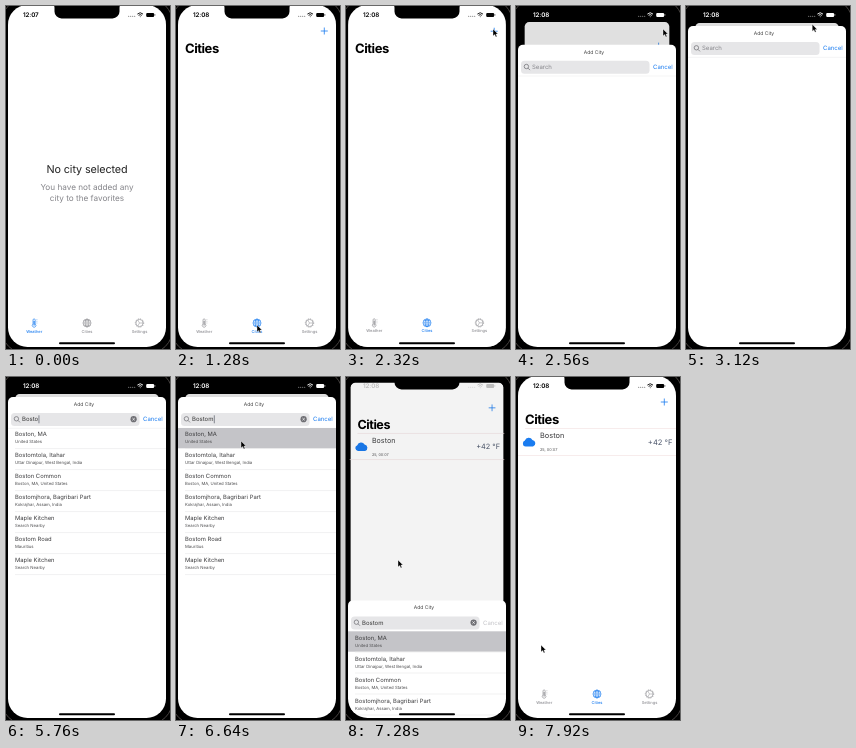
An HTML page that plays this animation: 164x343 px, repeating every 8 s.

```html
<!DOCTYPE html>
<html lang="en">
<head>
<meta charset="utf-8">
<title>Add a city</title>
<style>
  html, body { margin: 0; width: 100%; height: 100%; overflow: hidden; background: #000; }
  svg { display: block; width: 100vw; height: 100vh; }
  text { font-family: Inter, Roboto, sans-serif; white-space: pre; text-rendering: geometricPrecision; }
  .mid { text-anchor: middle; }
  .blue { fill: #1a7cf0; }
  .big { font-size: 10.8px; letter-spacing: -.1px; fill: #222; }
  .hint { font-size: 8.2px; fill: #85858a; }
  .title { font-size: 13px; font-weight: 700; letter-spacing: -.45px; }
  .field { font-size: 6px; }
  .name { font-size: 5.85px; fill: #3c3c3e; }
  .sub { font-size: 4.25px; fill: #4c4c4e; }
  .clock { font-size: 6.3px; font-weight: 600; letter-spacing: -.15px; }
  .line { stroke: #f2dfe0; stroke-width: .6; }
  .tab { color: #8e8e93; }
  .tab.on { color: #1a7cf0; }
  .tab text { font-size: 4px; font-weight: 500; fill: currentColor; }
  .tab g { fill: none; stroke: currentColor; stroke-width: .65; }
</style>
</head>
<body>
<svg viewBox="0 0 164 343">
  <defs>
    <clipPath id="screen"><rect x="2" y="-1" width="158" height="342" rx="19.5"/></clipPath>
  </defs>
  <rect x="-5" y="-8" width="172" height="356" rx="26" fill="#000" stroke="#4a4543" stroke-width="1"/>

  <g clip-path="url(#screen)">
    <g id="card">
      <rect id="page" x="2" y="-1" width="158" height="342" fill="#fff"/>
      <g id="weather" class="mid">
        <text class="big" x="81" y="167">No city selected</text>
        <text class="hint" x="81" y="184.3">You have not added any</text>
        <text class="hint" x="81" y="195.3">city to the favorites</text>
      </g>
      <g id="cities">
        <path d="M144.8 25h7M148.3 21.5v7" stroke="#1a7cf0" stroke-width=".8"/>
        <text class="title" x="9" y="46.7">Cities</text>
        <g id="saved">
          <path class="line" d="M9 51.5H161M1 78.5H161"/>
          <path class="blue" d="M9.6 69.600A3.1 3.1 0 0 1 8.9 63.600A4.1 4.1 0 0 1 16.4 63A3.4 3.4 0 0 1 17 69.600Z"/>
          <text x="24" y="61.3" font-size="7.4" fill="#3c3c3e">Boston</text>
          <text x="24" y="74.4" font-size="3.9" fill="#4c4c4e">25, 00:07</text>
          <text x="156.5" y="67.7" font-size="7.6" fill="#4c566b" text-anchor="end">+42 °F</text>
        </g>
      </g>
      <g class="mid">
        <g class="tab" id="tab0">
          <g>
            <path d="M27 318V314a1.1 1.1 0 0 1 2.2 0V318a1.8 1.8 0 1 1-2.2 0Z"/>
            <path d="M28.1 315v4.6" stroke-width="1.1"/>
            <path d="M30.4 313.6h1M30.4 315.3h1M30.4 317h1" stroke-width=".4"/>
          </g>
          <text x="28.2" y="326.6">Weather</text>
        </g>
        <g class="tab" id="tab1">
          <g>
            <circle cx="81" cy="317" r="4"/>
            <ellipse cx="81" cy="317" rx="1.9" ry="4"/>
            <path d="M77 317h8M81 313v8M77.7 314.8h6.6M77.7 319.2h6.6" stroke-width=".5"/>
          </g>
          <text x="81" y="326.6">Cities</text>
        </g>
        <g class="tab" id="tab2">
          <g>
            <circle cx="133.5" cy="317" r="3.6"/>
            <circle cx="133.5" cy="317" r="4.2" stroke-dasharray="1.1 1.1"/>
            <path d="M133.5 317h3.5M133.5 317l-1.8-3M133.5 317l-1.8 3" stroke-width=".5"/>
          </g>
          <text x="133.5" y="326.6">Settings</text>
        </g>
      </g>
      <rect id="dim" x="2" y="-1" width="158" height="342" fill="#000"/>
    </g>

    <g id="status">
      <text class="clock" id="clock" x="17" y="11.2"></text>
      <g opacity=".6">
        <circle cx="122.7" cy="10.2" r=".55"/><circle cx="124.7" cy="10.2" r=".55"/>
        <circle cx="126.7" cy="10.2" r=".55"/><circle cx="128.7" cy="10.2" r=".55"/>
      </g>
      <path id="wifi" d="M131.4 8.1a4 4 0 0 1 5.6 0M132.6 9.4a2.300 2.300 0 0 1 3.200 0M133.900 10.700h.6" fill="none" stroke-width=".9"/>
      <rect x="140.2" y="6.9" width="8" height="4" rx="1.2"/>
      <rect x="148.6" y="8.1" width=".7" height="1.6" rx=".3" opacity=".6"/>
    </g>

    <g id="sheet">
      <path d="M2 343V25a5 5 0 0 1 5-5H155a5 5 0 0 1 5 5V343Z" fill="#fff"/>
      <text class="mid" x="78" y="28.8" font-size="5" fill="#444">Add City</text>
      <rect x="5" y="36" width="128.5" height="13" rx="3.5" fill="#e6e6e8"/>
      <g fill="none" stroke="#77777c" stroke-width=".8">
        <circle cx="10.4" cy="41.8" r="2.2"/><path d="M12 43.4l2 2"/>
      </g>
      <text class="field" id="query" x="16" y="44.4"></text>
      <rect id="caret" y="38.3" width=".7" height="8" fill="#555a66"/>
      <g id="clear">
        <circle cx="127.6" cy="42.2" r="3.1" fill="#6f6f74"/>
        <path d="M126.4 41l2.4 2.4M128.8 41l-2.4 2.4" stroke="#fff" stroke-width=".7"/>
      </g>
      <text class="field" id="cancel" x="137" y="44.4">Cancel</text>
      <path d="M1 51.3H161" stroke="#e9e9eb" stroke-width=".5"/>
      <g id="results"><rect id="picked" x="1" y="51" width="160" height="20.3" fill="#c4c4c8"/></g>
    </g>
    <rect x="53" y="336.2" width="56" height="2" rx="1"/>
  </g>

  <path d="M46.500 -1h69q-2 0-2 3v3.400a7 7 0 0 1-7 7H55.500a7 7 0 0 1-7-7V2q0-3-2-3Z"/>
  <path id="cursor" d="M0 0V7L1.700 5.600L2.800 8L4 7.500L2.900 5.100H5Z" stroke="#fff" stroke-width=".4"/>
</svg>

<script>
const LOOP = 8000, STEP = 80;
const $ = id => document.getElementById(id);
const show = (id, on) => $(id).style.display = on ? '' : 'none';

const places = [
  ['Boston, MA', 'United States'],
  ['Bostomtola, Itahar', 'Uttar Dinajpur, West Bengal, India'],
  ['Boston Common', 'Boston, MA, United States'],
  ['Bostomjhora, Bagribari Part', 'Kokrajhar, Assam, India'],
  ['Maple Kitchen', 'Search Nearby'],
  ['Bostom Road', 'Mauritius'],
  ['Maple Kitchen', 'Search Nearby']
];
places.forEach(([name, sub], i) => {
  const y = 21 * i;
  $('results').insertAdjacentHTML('beforeend',
    `<text class="name" x="9" y="${59.4 + y}">${name}</text>
     <text class="sub" x="9" y="${66.4 + y}">${sub}</text>
     <path d="M9 ${71.6 + y}H161" stroke="#e2e2e4" stroke-width=".5"/>`);
});

const word = 'Bostom';
const keyTimes = [5120, 5280, 5440, 5520, 5680, 5920];

// Pointer stops: time, x, y
const stops = [
  [240, 128, 215], [800, 81, 319], [1360, 81, 319], [1920, 147, 23], [2640, 147, 23],
  [3200, 125, 18], [4480, 125, 18], [4560, 73, 37], [6080, 73, 37], [6480, 65, 64],
  [7040, 65, 64], [7280, 52, 183], [7840, 25, 268], [8000, 25, 268]
];

function pointer(t) {
  const i = Math.max(1, stops.findIndex(s => s[0] > t));
  const [t0, x0, y0] = stops[i - 1], [t1, x1, y1] = stops[i];
  const u = Math.max(0, (t - t0) / (t1 - t0)), e = u * u * (3 - 2 * u);
  return [x0 + (x1 - x0) * e, y0 + (y1 - y0) * e];
}

// Critically damped spring from 0 to 1
function spring(ms) {
  const x = Math.max(0, ms) * 0.01826;
  return 1 - (1 + x) * Math.exp(-x);
}

function draw(t) {
  const open = spring(t - 2310) - spring(t - 7163);
  const tab = t < 1120 ? 0 : 1;
  const closing = t >= 7160;

  show('weather', tab === 0);
  show('cities', tab === 1);
  show('saved', t >= 6880);
  for (let i = 0; i < 3; i++) $('tab' + i).classList.toggle('on', i === tab);

  const scale = 1 - 0.09 * open;
  $('card').setAttribute('transform',
    `translate(${81 * (1 - scale)} ${18 * open}) scale(${scale})`);
  $('page').setAttribute('rx', open > 0.01 ? 5 : 0);
  $('dim').setAttribute('rx', open > 0.01 ? 5 : 0);
  $('dim').setAttribute('opacity', 0.13 * open);

  const shade = Math.round(255 * Math.min(1, open * 2));
  const ink = `rgb(${shade},${shade},${shade})`;
  $('status').setAttribute('fill', ink);
  $('wifi').setAttribute('stroke', ink);
  $('clock').textContent = t < 400 ? '12:07' : '12:08';

  show('sheet', open > 0.001);
  $('sheet').setAttribute('transform', `translate(0 ${323 * (1 - open)})`);

  const typed = word.slice(0, keyTimes.filter(k => k <= t).length);
  const query = $('query');
  query.textContent = typed || 'Search';
  query.setAttribute('fill', typed ? '#333' : '#85858a');
  show('caret', t >= 4560 && !closing);
  $('caret').setAttribute('x', typed ? 16.4 + query.getComputedTextLength() : 15.6);
  show('clear', typed);
  show('results', t >= 5440);
  show('picked', t >= 6560);
  $('cancel').setAttribute('fill', closing ? '#c4c4c8' : '#1a7cf0');

  const hidden = t < 240 || (t >= 5120 && t < 6080);
  show('cursor', !hidden);
  $('cursor').setAttribute('transform', `translate(${pointer(t)})`);
}

const start = performance.now();
function tick() {
  const t = (performance.now() - start) % LOOP;
  draw(Math.floor(t / STEP) * STEP);
  requestAnimationFrame(tick);
}
tick();
</script>
</body>
</html>
```
